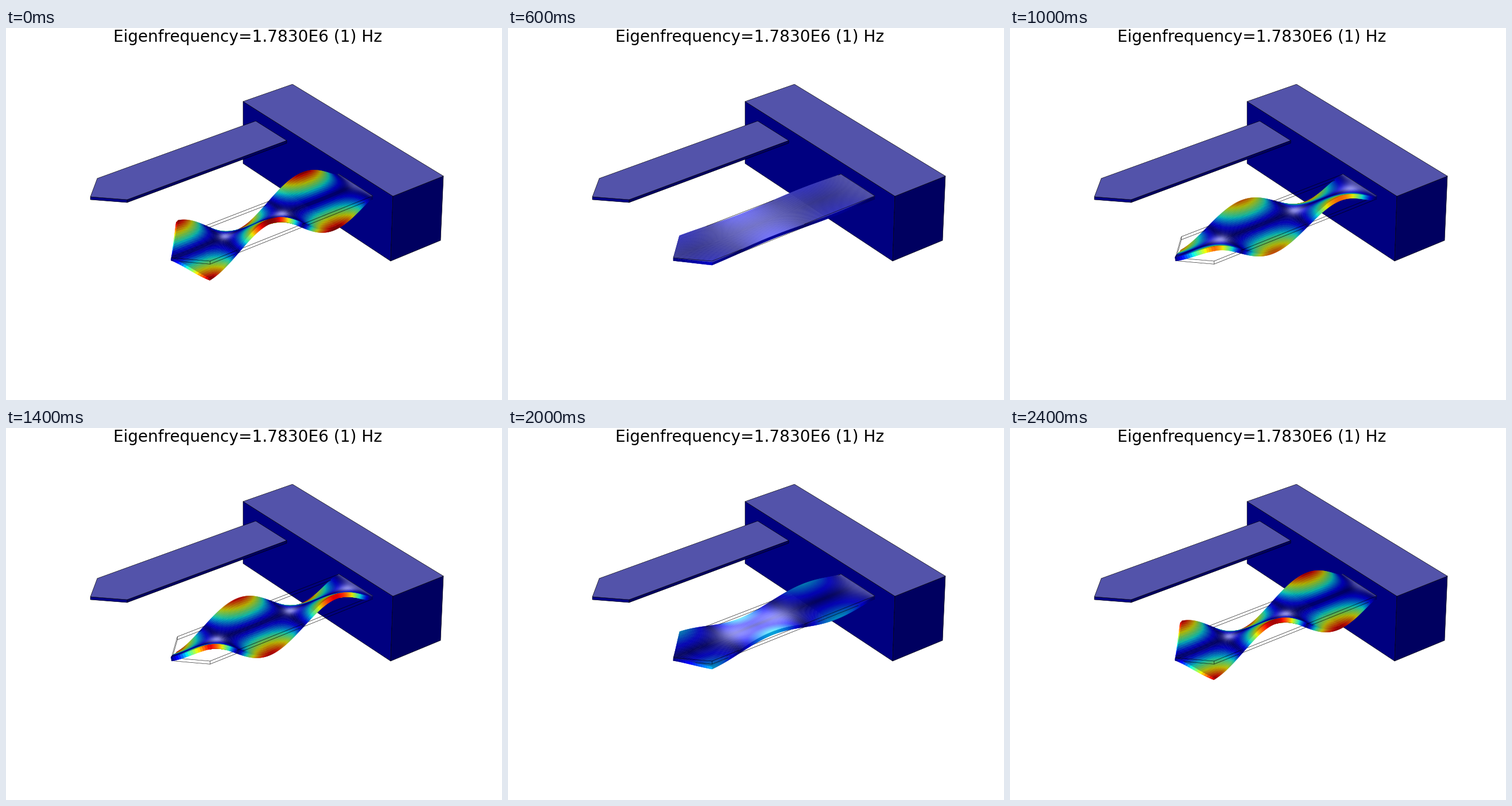
A matplotlib script that plays this animation: 864 px wide and 648 px high, repeating every 2.5 s.

```python
import numpy as np
import matplotlib
import matplotlib.pyplot as plt
from matplotlib.animation import FuncAnimation
from matplotlib.collections import LineCollection, PolyCollection

W, H, DPI, FRAMES = 864, 648, 72, 25
HALF, LENGTH, THICK, TIP = 48.0, 356.0, 6.2, 0.138
SIN_E, COS_E = 0.5215, 0.853          # camera elevation
TOP, FRONT, SIDE = "#5353aa", "#000080", "#000060"
JET = matplotlib.colormaps["jet"]

# Corners of the moving paddle at rest: (far, near) at root and at tip
ROOT = np.array([(580, 254.5), (639, 292.5)])
END = np.array([(298.5, 363.5), (355.5, 406)])

fig = plt.figure(figsize=(W / DPI, H / DPI), dpi=DPI, facecolor="white")
ax = fig.add_axes([0, 0, 1, 1])
ax.set(xlim=(0, W), ylim=(H, 0))
ax.axis("off")
ax.text(187.3, 24, "Eigenfrequency=1.7830E6 (1) Hz", family="DejaVu Sans",
        size=28, color="black", va="baseline")


def face(points, color, z):
    ax.add_patch(plt.Polygon(points, facecolor=color, edgecolor="black",
                             linewidth=0.6, joinstyle="round", zorder=z))


def project(u, v, z):
    """Paddle coordinates (along, across, height) to pixels."""
    u, v, z = np.broadcast_arrays(u, v, z)
    far = ROOT[0] + u[..., None] * (END[0] - ROOT[0])
    near = ROOT[1] + u[..., None] * (END[1] - ROOT[1])
    s = (v[..., None] + 1) / 2
    p = far + s * (near - far)
    rise = z * COS_E
    lean = 0.00014 * (p[..., 0] - 413)
    return np.stack([p[..., 0] + lean * rise, p[..., 1] - rise], -1)


def twist(u):
    """Torsion angle along the paddle, clamped at the root, and its slope."""
    k, u0 = 7.85, 0.03
    soft = np.exp(-u / u0)
    phase = k * (u - u0 * (1 - soft))
    size = 34 + 1.5 * u
    return size * np.sin(phase), size * k * (1 - soft) * np.cos(phase)


def cells(g):
    return np.stack([g[:-1, :-1], g[1:, :-1], g[1:, 1:], g[:-1, 1:]], 2)


def flat_cells(g):
    c = cells(g)
    return c.reshape(-1, 4, *g.shape[2:])


# Block
face([(413, 128), (674, 293), (670, 406), (413, 236)], FRONT, 1)
face([(674, 293), (762, 258), (757, 370), (670, 406)], SIDE, 1)
face([(413, 128), (499, 98), (762, 258), (674, 293)], TOP, 1)

# Resting paddle
face([(211, 299), (489, 196), (489, 200.5), (211, 304)], SIDE, 2)
face([(147, 294), (211, 299), (211, 304), (147, 299)], "#000084", 2)
face([(435, 162), (489, 196), (211, 299), (147, 294), (159, 262)], TOP, 2)

# Grid of the moving paddle with its pointed end
V = np.linspace(-1, 1, 33)[None, :]
U = np.linspace(0, 1, 141)[:, None] * (1 + TIP * (1 - abs(V)))
V = np.broadcast_to(V, U.shape)
TH, DTH = twist(U)
PEAK = abs(TH * V).max()

# Outline of the paddle at rest
steps = np.linspace(0, 1, 61)
corners = np.array([(0, -1), (1, -1), (1 + TIP, 0), (1, 1), (0, 1), (0, -1)])
rim = np.concatenate([a + steps[:, None] * (b - a)
                      for a, b in zip(corners[:-1], corners[1:])])
rim_mid = (rim[:-1] + rim[1:]) / 2
on_root = rim_mid[:, 0] < 1e-6

under = LineCollection([], colors="black", linewidths=0.6, zorder=3)
skin = PolyCollection([], linewidths=0.5, zorder=4)
over = LineCollection([], colors="black", linewidths=0.6, zorder=5)
for item in (under, skin, over):
    ax.add_collection(item, autolim=False)


def layer(offset, w, wa, wb):
    """Pixels and nearness of the points at one depth in the plate."""
    arm = offset + THICK / 2
    u, v, z = U - arm * wa / LENGTH, V - arm * wb / HALF, w + offset
    ground = project(u, v, 0)[..., 1]
    return project(u, v, z), ground / SIN_E * COS_E + z * SIN_E


def shade_top(wa, wb):
    norm = np.sqrt(1 + wa ** 2 + wb ** 2)
    na, nb, nz = -wa / norm, -wb / norm, 1 / norm
    lit_a = np.where(na > 0, 1.0, 0.6)
    lit_b = np.where(nb > 0, 0.75, 0.6)
    diffuse = lit_a * na ** 2 + lit_b * nb ** 2 + 0.68 * nz ** 2
    glance = (nz - 0.14 * nb) / np.hypot(1, 0.14)
    return diffuse, 0.57 * np.clip(glance, 0, 1) ** 56


def draw_skin(amp):
    w, wa, wb = -amp * TH * V, -amp * DTH * V / LENGTH, -amp * TH / HALF
    top, top_key = layer(0, w, wa, wb)
    low, low_key = layer(-THICK, w, wa, wb)
    level = abs(w) / PEAK
    diffuse, gloss = shade_top(wa, wb)
    dull = np.zeros_like(w)
    tilt = np.clip(wb / np.sqrt(1 + wb ** 2), 0, 1)

    def strip(cut, light):
        """Narrow wall between the upper and lower rim."""
        def pair(a, b):
            return np.stack([a[cut], b[cut]], 1)
        return (pair(top, low), pair(top_key, low_key), pair(level, level),
                pair(light, light), pair(dull, dull))

    flip = np.s_[:, ::-1]
    parts = [
        (top, top_key, level, diffuse, gloss),
        (low[flip], low_key[flip], level[flip], dull + 0.7, dull),
        strip(np.s_[:, -1], 0.75 + 0.45 * tilt),
        strip(np.s_[-1, ::-1], dull + 1),
        strip(np.s_[::-1, 0], dull + 0.6),
    ]
    quads, key, value, light, shine = (
        np.concatenate([flat_cells(p[i]) for p in parts]) for i in range(5))
    d1, d2 = quads[:, 2] - quads[:, 0], quads[:, 3] - quads[:, 1]
    facing = d1[:, 0] * d2[:, 1] - d1[:, 1] * d2[:, 0] < 0
    order = np.argsort(key.mean(1))
    order = order[facing[order]]

    rgb = JET(value.mean(1))[:, :3] * light.mean(1)[:, None]
    rgb = np.clip(rgb + shine.mean(1)[:, None], 0, 1)[order]
    skin.set_verts(quads[order])
    skin.set_facecolor(rgb)
    skin.set_edgecolor(rgb)


def draw_wire(amp):
    front, back = [], []
    w = -amp * twist(rim_mid[:, 0])[0] * rim_mid[:, 1]
    for z in (0, -THICK):
        p = project(rim[:, 0], rim[:, 1], z)
        segs = np.stack([p[:-1], p[1:]], 1)
        shown = w < z + 0.1
        if z:
            segs, shown = segs[~on_root], shown[~on_root]
        front.extend(segs[shown])
        back.extend(segs[~shown])
    for u, v in corners[1:4]:
        bar = project(u, v, np.array([0, -THICK]))
        lift = -amp * twist(u)[0] * v
        (front if lift < -THICK / 2 else back).append(bar)
    over.set_segments(front)
    under.set_segments(back)


def update(i):
    amp = np.cos(2 * np.pi * i / FRAMES)
    draw_skin(amp)
    draw_wire(amp)
    return under, skin, over


anim = FuncAnimation(fig, update, frames=FRAMES, interval=100,
                     repeat=True, repeat_delay=0, blit=False)
plt.show()
```
